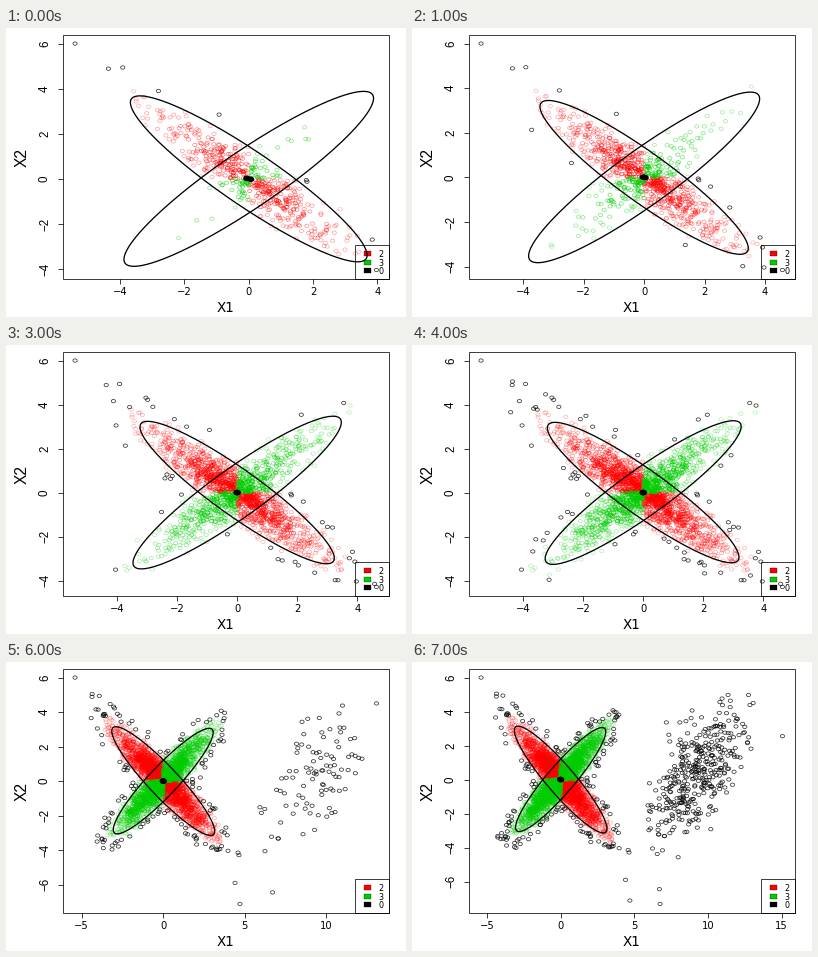
These frames come from a looping animation (400x289 px, 8000 ms). A matplotlib script:

```python
import numpy as np
import matplotlib.pyplot as plt
from matplotlib.animation import FuncAnimation
from matplotlib.patches import Ellipse, Rectangle
from matplotlib.path import Path
from matplotlib.transforms import Affine2D

W, H, DPI = 400, 289, 64
PX = 72 / DPI  # points per pixel
LEFT, TOP, RIGHT, BOTTOM = 57, 6.5, 382.5, 251
RED, GREEN, BLACK = (1, 0, 0), (0, 0.8, 0), (0, 0, 0)
RHO, SD = 0.92, 1.47
FRINGE = 1.38  # points beyond this squared distance are outliers
PAD = 0.04     # axis margin around the data

NARROW, BROAD = "Liberation Sans", "DejaVu Sans"
OVAL = Path.unit_circle().transformed(Affine2D().scale(1, 0.8))

# Extreme points that set the axis ranges: step of arrival, x, y
EXTREMES = np.array([
    (0, -5.4, 6), (0, 3.97, -4.04), (1, 4.58, -4.15), (2, 4.64, -4.29),
    (6, 4.7, -7.12), (6, 13.06, 4.5), (6, 6.7, -6.45), (6, 4.4, -5.9),
    (7, 15.05, 2.55), (7, 6.75, -7.32)])


def extents(i):
    """Half extents of the falling and rising ellipses."""
    fall = 3.13 + 0.55 * 0.58 ** i
    rise = 3.06 + 0.41 * (1 + np.cos(np.pi * min(i / 6, 1)))
    return fall, rise


def counts(i):
    """Points seen so far on the falling arm, rising arm and far cluster."""
    return 500 + 250 * i, 18 + 90 * i + 32 * i * i, max(0, 280 * i - 1585)


def gaussian(rng, n, rho):
    a, b = rng.standard_normal((2, n))
    return np.column_stack([a, rho * a + np.sqrt(1 - rho * rho) * b])


def inside(p, x_min, x_max, y_min, y_max):
    x, y = p.T
    return p[(x > x_min) & (x < x_max) & (y > y_min) & (y < y_max)]


def distance(p, size, rho):
    x, y = p.T
    return (x * x + y * y - 2 * rho * x * y) / (size ** 2 * (1 - rho ** 2))


rng = np.random.default_rng(12)
falling, rising = (inside(SD * gaussian(rng, 3000, rho), -4.6, 3.95, -4.04, 5.1)
                   for rho in (-RHO, RHO))
far = inside(gaussian(rng, 800, 0.62) * (1.75, 2.15) + (9.1, 0.3),
             5.9, 13, -5.2, 5.2)

fig = plt.figure(figsize=(W / DPI, H / DPI), dpi=DPI, facecolor="white")
ax = fig.add_axes([0, 0, 1, 1])


def label(x, y, s, size, font=BROAD, rotation=0):
    ax.text(x, y, str(s).replace("-", "\u2212"), size=size * PX, family=font,
            rotation=rotation, ha="center",
            va="center" if rotation else "center_baseline")


def line(x, y, width=0.75):
    ax.plot(x, y, color="black", lw=width * PX, solid_capstyle="butt")


def frame_box(x, y):
    ax.add_patch(Rectangle((x, y), RIGHT - x, BOTTOM - y, fill=False,
                           lw=0.75 * PX))


def circles(p, color, alpha):
    rgba = np.column_stack([np.tile(color, (len(p), 1)),
                            np.broadcast_to(alpha, len(p))])
    ax.scatter(p[:, 0], p[:, 1], s=(4.2 * PX) ** 2, marker=OVAL,
               facecolors="none", edgecolors=rgba, linewidths=0.75 * PX,
               zorder=2)


def scale(values, start, end):
    """Origin and pixels per unit of an axis that just fits the values."""
    low, high = values.min(), values.max()
    unit = (end - start) / ((high - low) * (1 + 2 * PAD))
    return start - (low - PAD * (high - low)) * unit, unit


def draw_axes(x0, sx, y0, sy):
    frame_box(LEFT, TOP)
    for v in range(-20, 21, 2 if sx > 25 else 5):
        x = x0 + v * sx
        if LEFT < x < RIGHT:
            line([x, x], [BOTTOM, BOTTOM + 5])
            label(x, 263.2, v, 10)
    for v in range(-20, 21, 2):
        y = y0 + v * sy
        if TOP < y < BOTTOM:
            line([LEFT - 5, LEFT], [y, y])
            label(39, y, v, 11.5, NARROW, 90)
    label(219.5, 279, "X1", 13.5)
    label(16, 129.5, "X2", 15.5, NARROW, 90)


def draw_legend():
    frame_box(349, 217)
    for k, (name, color) in enumerate(zip("230", (RED, GREEN, BLACK))):
        y = 225.7 + 8.5 * k
        ax.add_patch(Rectangle((357.7, y - 2.5), 7, 5, fc=color,
                               ec="black", lw=0.3 * PX))
        label(375.3, y, name, 8)


def draw(i):
    ax.cla()
    ax.set(xlim=(0, W), ylim=(H, 0))
    ax.axis("off")

    fall, rise = extents(i)
    n_fall, n_rise, n_far = counts(i)
    p = np.vstack([falling[:n_fall], rising[:n_rise]])
    loose = np.vstack([far[:n_far], EXTREMES[EXTREMES[:, 0] <= i, 1:]])
    x, y = np.vstack([p, loose]).T
    x0, sx = scale(x, LEFT, RIGHT)
    y0, sy = scale(y, BOTTOM, TOP)

    def place(q):
        return q * (sx, sy) + (x0, y0)

    # Colour by quadrant, fading outwards; the rest are outliers
    d = np.minimum(distance(p, fall, -RHO), distance(p, rise, RHO))
    same_sign = p[:, 0] * p[:, 1] > 0
    for color, mine in ((RED, ~same_sign), (GREEN, same_sign)):
        keep = mine & (d <= FRINGE)
        circles(place(p[keep]), color, 0.25 + 0.35 * np.exp(-2 * d[keep]))
    circles(place(np.vstack([p[d > FRINGE], loose])), BLACK, 0.8)

    t = np.linspace(0, 2 * np.pi, 200)
    for size, rho in ((fall, -RHO), (rise, RHO)):
        line(x0 + size * np.cos(t) * sx,
             y0 + size * np.cos(t - np.arccos(rho)) * sy, 1.3)

    gap = 2 * 0.5 ** i
    for side in (-gap, gap):
        ax.add_patch(Ellipse((x0 + side, y0 + side / 4), 7, 5.6, fc="black",
                             zorder=5))

    draw_axes(x0, sx, y0, sy)
    draw_legend()
    return []


anim = FuncAnimation(fig, draw, frames=8, init_func=lambda: [],
                     interval=1000, repeat=True, repeat_delay=0)
plt.show()
```
